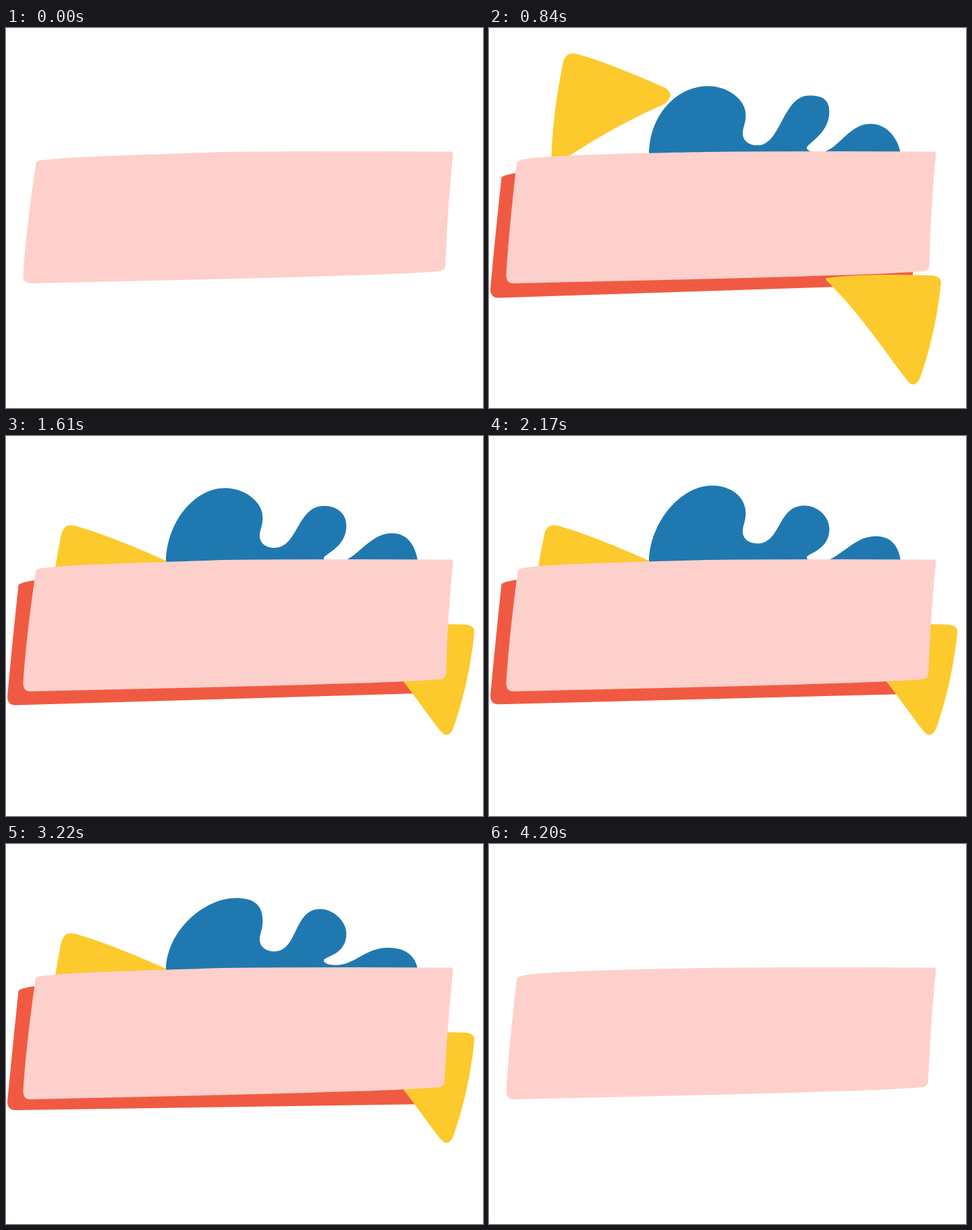
Animation, 707 px wide and 564 px high, one loop 4.34 s. Source, as an HTML page with a canvas:

```html
<!DOCTYPE html>
<html lang="en">
<head>
<meta charset="utf-8">
<title>Banner</title>
<style>
html, body { margin: 0; width: 100%; height: 100%; overflow: hidden; background: #fff; }
canvas { display: block; }
</style>
</head>
<body>
<canvas id="stage" width="707" height="564"></canvas>
<script>
const LOOP = 4340, STEP = 70;
const ctx = document.getElementById('stage').getContext('2d');

const lerp = (a, b, p) => a + (b - a) * p;
const span = (t, from, to) => Math.min(1, Math.max(0, (t - from) / (to - from)));
const turn = (t, lag = 0) => 2 * Math.PI * (t - lag) / LOOP;

function ease(t, from, to) {
  const p = span(t, from, to);
  return p < .5 ? 2 * p * p : 1 - 2 * (1 - p) ** 2;
}

function fill(color, path) {
  ctx.fillStyle = color;
  ctx.fill(new Path2D(path));
}

// Draws a path with its anchor point moved to (x, y).
function place(color, path, [ax, ay], x, y, size) {
  ctx.save();
  ctx.translate(x, y);
  ctx.scale(size, size);
  ctx.translate(-ax, -ay);
  fill(color, path);
  ctx.restore();
}

// Blue splash: lobe tops circle once per loop, the hollows bob up and down.
function drawSplash(t) {
  const size = ease(t, 400, 850) - ease(t, 3700, 4180);
  if (size <= 0) return;
  const orbit = (x, y, r, phase) => {
    const a = turn(t) + phase;
    return [x + r * Math.cos(a), y + r * Math.sin(a)];
  };
  const bob = (y, r, lag) => y + r * Math.cos(turn(t, lag));
  const [ax, ay] = orbit(332, 82, 8.5, 1.4);
  const [bx, by] = orbit(470, 99, 5, -1);
  const [cx, cy] = orbit(567, 148, 6, -3);
  const cheek = bob(121, 9, 530), waist = cheek + 27, dip = cheek + 45;
  const side = bob(130, 8.5, 2400), hook = bob(176, 5.5, 1700), bay = hook + 7;
  const path = `M237 300 V187 C238 128 ${ax - 46} ${ay} ${ax} ${ay}
    C${ax + 28} ${ay} 380.5 ${cheek - 24} 380.5 ${cheek}
    C380.5 ${cheek + 12} 376 ${waist - 8} 376 ${waist}
    C376 ${waist + 11} 385 ${dip} 398 ${dip}
    C433 ${dip} ${bx - 40} ${by} ${bx} ${by}
    C${bx + 19} ${by} 504.5 ${side - 19} 504.5 ${side}
    C504.5 ${side + 32} 471 ${hook - 6} 471 ${hook}
    C471 ${hook + 4} 478 ${bay} 488 ${bay}
    C518 ${bay} ${cx - 35} ${cy} ${cx} ${cy}
    C${cx + 25} ${cy} 608 165 611 190 V300Z`;
  place('#1f79b0', path, [425, 189], 425, 189, size);
}

// Red shadow: wiped on and off from the left while it slowly tilts.
function drawShadow(t) {
  const from = 650 * ease(t, 3430, 3990), to = 650 * ease(t, 230, 820);
  if (to <= from) return;
  const tilt = 11 * (t / LOOP) ** 2;
  const top = 222 - tilt * .7, left = 401 - tilt, right = 380 + tilt;
  ctx.save();
  ctx.beginPath();
  ctx.rect(from, 0, to - from, 564);
  ctx.clip();
  fill('#f15a42', `M18.5 ${top} Q22 ${top - 4} 44 ${top - 7} L640 205 L627 ${right}
    L14 ${left} Q2 ${left} 2 ${left - 13} Q9 310 18.5 ${top}Z`);
  ctx.restore();
}

// Yellow triangles: pop out from behind the banner, swing to rest, slip back.
const triangles = [
  {
    path: `M164 157 C165 110 170 65 181 12 Q185 -5 203 1 C245 13 290 33 325 48
      Q341 58 325 71 C272 95 225 120 168 160 Q164 162 164 157Z`,
    anchor: [190, 0], out: [193, -1.5], rest: [91.5, 133], start: [300, 240], end: [250, 215]
  },
  {
    path: `M445 416 Q443 412 448 412 C490 407 540 407 596 409 Q610 411 607 423
      C603 465 592 515 578 554 Q570 572 558 556 C525 512 490 460 445 416Z`,
    anchor: [568, 564], out: [565.5, 565.5], rest: [652.5, 444], start: [420, 340], end: [540, 340]
  }
];

function drawTriangle({ path, anchor, out, rest, start, end }, t) {
  if (t < 210 || t >= 3920) return;
  const pop = 1 - (1 - span(t, 210, 490)) ** 2;
  const across = ease(t, 490, 1050), down = ease(t, 490, 1400);
  const swing = Math.sin(Math.PI * span(t, 770, 1610)) ** 2;
  const leave = ease(t, 3570, 3920);
  const [x, y] = [across + .1 * swing, down].map((p, i) =>
    lerp(lerp(lerp(start[i], out[i], pop), rest[i], p), end[i], leave));
  const size = lerp(lerp(.45, 1, pop) + .058 * across + .053 * swing, .6, leave);
  place('#fcca2d', path, anchor, x, y, size);
}

// Pink banner: its corners sway slightly.
function drawBanner(t) {
  const sway = Math.cos(2.5 * turn(t));
  const left = 42.7 + 1.7 * sway, right = 651.3 + 1.3 * Math.sin(turn(t));
  const top = 188 + sway;
  fill('#fed0cb', `M${left} 200 Q${left + 1} 196 60 ${top + 6.5} C100 ${top + 1.5} 230 ${top - 1.5} 320 184
    Q480 182.5 660 183.5 Q663 183.5 662.5 187 Q655 260 ${right} 352
    Q${right} 359 ${right - 8} 361 C580 366 480 368 380 371
    C280 374 150 376 38 379 Q25 380 25.5 366 Q29 305 ${left} 200Z`);
}

function draw(now) {
  const t = Math.min(4200, Math.floor((now % LOOP) / STEP) * STEP);
  const pose = t < 140 ? 0 : t;
  ctx.clearRect(0, 0, 707, 564);
  drawSplash(pose);
  drawShadow(pose);
  triangles.forEach(tri => drawTriangle(tri, pose));
  drawBanner(pose);
}

const begin = performance.now();
function loop() {
  draw(performance.now() - begin);
  requestAnimationFrame(loop);
}
loop();
</script>
</body>
</html>
```
